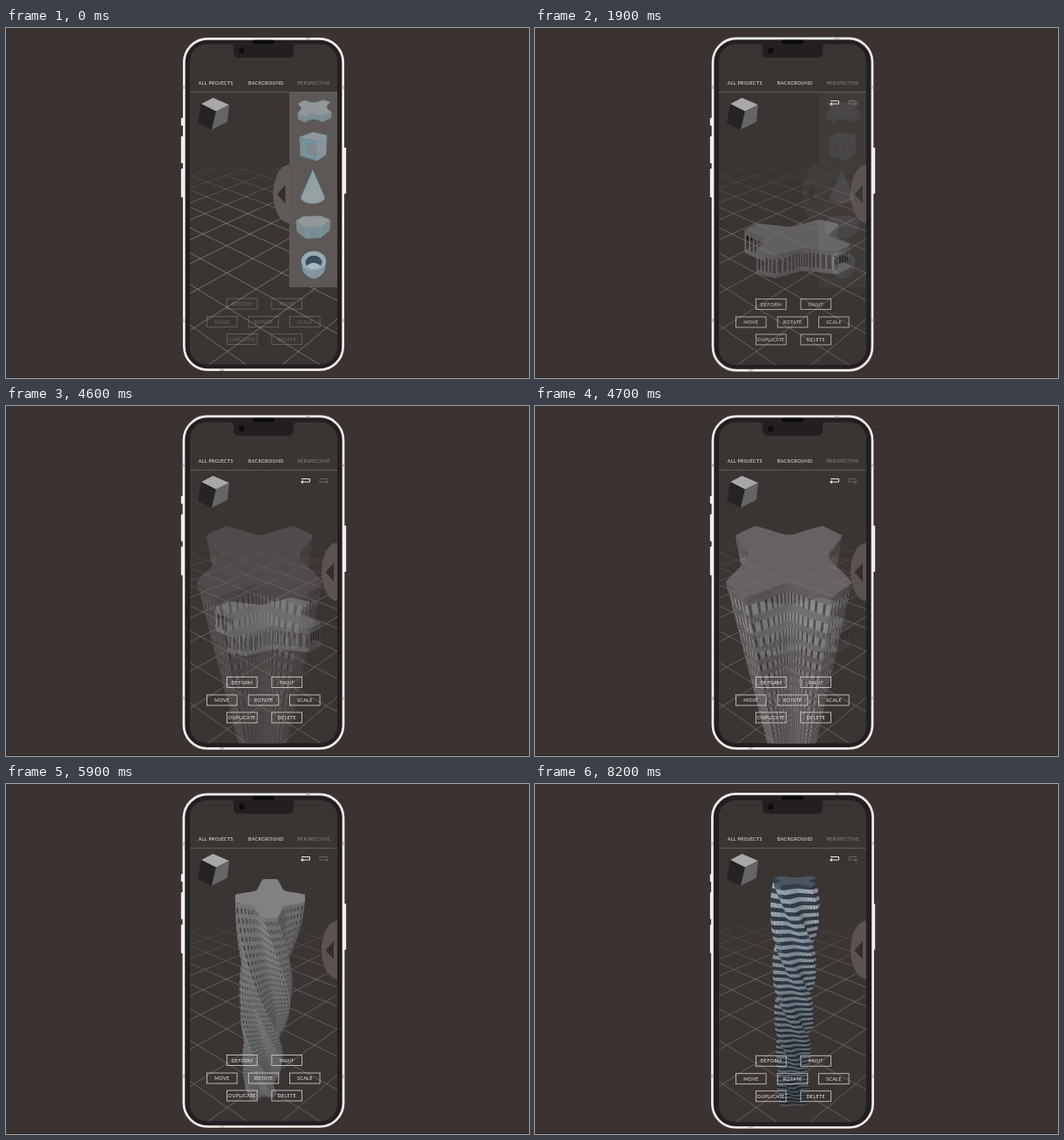
Animation, 600 px wide and 401 px high, one loop 9100 ms. Source, as an HTML page with a canvas:

```html
<!DOCTYPE html>
<html lang="en">
<head>
<meta charset="utf-8">
<title>Phone modelling app</title>
<style>
html, body { margin: 0; width: 100%; height: 100%; overflow: hidden; background: #3b3331; }
canvas { display: block; }
</style>
</head>
<body>
<canvas id="stage" width="600" height="401"></canvas>
<script>
const LOOP = 9100;
const FADES = [[1600, 5], [4600, 3], [5700, 3], [7800, 5]]; // start, steps of 100 ms
const BACK = '#3b3331', BEZEL = '#231f20', WHITE = '#f1efec';
const TAU = Math.PI * 2;

let c; // context being painted

function shape(d, fill, stroke, width = 0.5) {
  const p = new Path2D(d);
  if (fill) { c.fillStyle = fill; c.fill(p); }
  if (stroke) { c.strokeStyle = stroke; c.lineWidth = width; c.stroke(p); }
}

function rect(x, y, w, h, fill) {
  c.fillStyle = fill;
  c.fillRect(x, y, w, h);
}

function round(x, y, w, h, r, fill, stroke, width) {
  c.beginPath();
  c.roundRect(x, y, w, h, r);
  if (fill) { c.fillStyle = fill; c.fill(); }
  if (stroke) { c.strokeStyle = stroke; c.lineWidth = width; c.stroke(); }
}

function oval(x, y, rx, ry, fill, stroke) {
  c.beginPath();
  c.ellipse(x, y, rx, ry, 0, 0, TAU);
  if (fill) { c.fillStyle = fill; c.fill(); }
  if (stroke) { c.strokeStyle = stroke; c.lineWidth = 0.6; c.stroke(); }
}

function label(text, x, y, color, align = 'left') {
  c.font = '5.4px Lato, "Open Sans", sans-serif';
  c.letterSpacing = '0.3px';
  c.textAlign = align;
  c.textBaseline = 'middle';
  c.fillStyle = color;
  c.fillText(text, x, y);
}

// ---- phone and interface ----

function phone(g) {
  const x = 203 - g / 2, y = 11 - g / 2, w = 185 + g, h = 382 + g * 1.5;
  for (const [by, bh] of [[103, 9], [124, 31], [161, 33]]) round(200.8, by, 3, bh, 1, WHITE);
  round(387, 137, 3.2, 53, 1, WHITE);
  round(x + 1.3, y + 1.3, w - 2.6, h - 2.6, 27, BEZEL, WHITE, 2.7);
  const mark = '#a5a19e90';
  for (const my of [66, 333]) {
    rect(x - 0.3, my, 2.8, 4, mark);
    rect(x + w - 2.5, my, 2.8, 4, mark);
  }
  rect(344, y, 5, 2.6, mark);
  rect(245, y + h - 2.6, 5, 2.6, mark);
}

function notch() {
  shape('M258,18.5 Q261,18.5 261,22 V28 Q261,34 267,34 H324 Q330,34 330,28 V22 Q330,18.5 333,18.5 Z', BEZEL);
  round(283, 13.8, 25, 4.5, 2, '#0c0b0b');
  oval(270.5, 26, 3.4, 3.4, '#0d0c0e');
}

function grid(color) {
  const left = [-313, -30], right = [815, -30], o = [280, 236], step = 0.048;
  const fade = c.createLinearGradient(0, 150, 0, 225);
  fade.addColorStop(0, color + '00');
  fade.addColorStop(1, color + 'd0');
  c.strokeStyle = fade;
  c.lineWidth = 0.6;
  for (const [from, to] of [[left, right], [right, left]])
    for (let n = -14; n < 24; n++) {
      const k = step * n;
      const x = (o[0] + k * from[0]) / (1 + k), y = (o[1] + k * from[1]) / (1 + k);
      c.beginPath();
      c.moveTo(to[0], to[1]);
      c.lineTo(to[0] + (x - to[0]) * 4, to[1] + (y - to[1]) * 4);
      c.stroke();
    }
}

function header() {
  label('ALL PROJECTS', 220.8, 63.6, '#efedeb');
  label('BACKGROUND', 278, 63.6, '#efedeb');
  label('PERSPECTIVE', 334.5, 63.6, '#8d8885');
  rect(211, 73, 169, 0.8, '#6c6663');
  shape('M224,87 L237.5,80 L256,88 L241,95.5 Z', '#a9a8a8');
  shape('M224,87 L241,95.5 L236,116.5 L220,109 Z', '#262324');
  shape('M241,95.5 L256,88 L254,107.5 L236,116.5 Z', '#666565');
}

function handle(x, color) {
  c.beginPath();
  c.ellipse(x, 190, 18.5, 33.5, 0, TAU / 4, TAU * 0.75);
  c.fillStyle = color;
  c.fill();
  shape(`M${x - 14},190.5 l9.5,-10.5 v21 Z`, '#342d2c');
}

function buttons(dy) {
  const rows = [
    [316, ['DEFORM', 270.8], ['PAINT', 322.2]],
    [336.5, ['MOVE', 247.8], ['ROTATE', 295.5], ['SCALE', 342.8]],
    [356.5, ['DUPLICATE', 270.8], ['DELETE', 322.2]]
  ];
  for (const [y, ...row] of rows)
    for (const [text, x] of row) {
      c.strokeStyle = '#d9d6d3';
      c.lineWidth = 0.8;
      c.strokeRect(x - 17.3, y + dy - 6, 34.6, 12);
      label(text, x, y + dy + 0.5, '#efedeb', 'center');
    }
}

function history() {
  shape('M340,87 H348.5 V83.5 H339', null, '#efedeb', 1);
  shape('M337.8,87 l3,-2 v4 Z', '#efedeb');
  shape('M368,87 H360 V83.5 H369', null, '#6a6461', 1);
  shape('M370.2,87 l-3,-2 v4 Z', '#6a6461');
}

// ---- panel of solids ----

function panel() {
  const edge = '#62a9c4', top = '#929799', side = '#7f888c';
  c.globalAlpha = 0.93;
  rect(325, 74, 55, 223, '#605a58');
  c.globalAlpha = 1;
  handle(325, '#605a58');

  const star = 'M335,87 L342,83 Q354,88 364,82.5 L372,85 Q363,91 373,96 L363,101 Q352,95 343,101 L335,97 Q343,92 335,87 Z';
  shape('M335,87 Q343,92 335,97 V104 L343,108 Q352,101 363,107.5 L373,103 V96 L363,91 Z', side, edge);
  shape(star, top, '#86979f');
  for (let i = 0; i < 8; i++) {
    const y = 100.5 - Math.sin(i / 7 * Math.PI) * 3;
    shape(`M${343 + i * 2.9},${y} v6.5`, null, edge, 0.4);
  }

  shape('M337,125 L352,119.5 L368,123 L357,129.5 Z', top, edge);
  shape('M337,125 L357,129.5 V152 L338,146.5 Z', side, edge);
  shape('M357,129.5 L368,123 L367,145 L357,152 Z', '#8d9294', edge);
  shape('M342,129 V145 L354,148 M342,129 L355,132', null, edge, 1);

  shape('M352,163 L338.5,194 A13.5,7 0 0 0 365.5,194 Z', '#9aa09f', edge);
  for (let i = 1; i < 12; i++) {
    const a = i / 12 * Math.PI;
    shape(`M352,163 L${352 - 13.5 * Math.cos(a)},${194 + 7 * Math.sin(a)}`, null, edge, 0.15);
  }

  shape('M333,221 L343,228.5 L361,228 L372,221 L371,232 L361,240 L344,241 L334,233 Z', side, edge);
  shape('M333,221 L341,216 L361,215.5 L372,220 L361,228 L343,228.5 Z', top, '#86979f');
  shape('M344,229 V240 M347,229 V240 M358,229 V240 M361,228.5 V239.5', null, edge, 0.8);

  shape('M339,267 A14,11 0 0 1 367,267 L365,279 Q353,295 341,279 Z', '#87959b', edge);
  oval(353, 267, 14, 11, '#9ea9ad', edge);
  oval(353, 268.5, 9.6, 7.8, '#2d3a42', edge);
  for (let i = -4; i < 5; i++) shape(`M${353 + i * 2},${262 + Math.abs(i) * 0.6} v8`, null, edge, 0.4);
  shape('M344.5,273 Q353,265 361.5,273 Q353,280 344.5,273 Z', '#a9b8be');
}

// ---- buildings: stacked four-pointed floors ----

const SIDES = 240;

// Radius of the floor outline: blunt tips, hollow sides.
function radius(angle) {
  const q = TAU / 4, tip = 0.2;
  const a = Math.abs(((angle % q) + q * 1.5) % q - q / 2);
  if (a < tip) return 1 / Math.cos(a);
  return 0.58 + 0.44 * ((q / 2 - a) / (q / 2 - tip)) ** 2;
}

function ring({ x, y, rx, ry, turn, wide = 0 }) {
  return Array.from({ length: SIDES + 1 }, (_, i) => {
    const a = i / SIDES * TAU, r = radius(a);
    const px = r * Math.cos(a + turn), py = r * Math.sin(a + turn);
    const near = 1 + wide * py;
    return [x + rx * px * near, y + ry * py * near];
  });
}

function tint([r, g, b], f) {
  return `rgb(${r * f},${g * f},${b * f})`;
}

function polygon(points, fill) {
  c.beginPath();
  points.forEach(p => c.lineTo(p[0], p[1]));
  c.closePath();
  c.fillStyle = fill;
  c.fill();
}

// Paints the walls that face the viewer, far ones first.
function wall(upper, lower, color) {
  const order = [];
  for (let i = 0; i < SIDES; i++) if (upper[i + 1][0] < upper[i][0]) order.push(i);
  order.sort((i, j) => upper[i][1] - upper[j][1]);
  for (const i of order) {
    const [a, b] = [upper[i], upper[i + 1]];
    const facing = (b[1] - a[1]) / Math.hypot(b[0] - a[0], b[1] - a[1]);
    const fill = color(i, 0.9 - 0.25 * facing);
    if (fill) polygon([a, b, lower[i + 1], lower[i]], fill);
  }
}

function tower({ floors, place, slab, roof, pane, gap, part = 0.4, dim = 0 }) {
  for (let k = floors - 1; k >= 0; k--) {
    const top = ring(place(k)), under = ring(place(k + part)), foot = ring(place(k + 1));
    const depth = 1 - dim * k / floors;
    wall(under, foot, (i, f) => tint(i % 3 ? pane : gap, f * depth));
    wall(top, under, (i, f) => tint(slab, f * depth));
    polygon(top, tint(k ? slab : roof, depth));
  }
}

// Floors shrink towards a point below.
function receding(rate, top, vanish, rx, ry, start, twist, wide) {
  return k => {
    const s = 1 / (1 + rate * k);
    return {
      x: vanish[0] + (top[0] - vanish[0]) * s,
      y: vanish[1] + (top[1] - vanish[1]) * s,
      rx: rx * s, ry: ry * s, turn: start - twist * k, wide
    };
  };
}

function pavilion() {
  const at = y => ({ x: 301, y, rx: 65, ry: 22, turn: 0.6 });
  const grey = [112, 110, 110];
  polygon(ring(at(265)), '#454040');
  wall(ring(at(261)), ring(at(266)), (i, f) => tint(grey, f));
  shape('M242,231 H253 V242 L242,244 Z', '#161415');
  shape('M349,259 L361,254 V266 L349,270 Z', '#1d1b1b');
  wall(ring(at(243)), ring(at(262)), (i, f) => i % 3 ? null : tint(grey, f * 1.1));
  wall(ring(at(240)), ring(at(245)), (i, f) => tint(grey, f));
  polygon(ring(at(240)), '#6d6b6b');
}

function highRise() {
  tower({
    floors: 34, part: 0.42,
    place: receding(0.085, [291, 173], [297, 505], 79, 48, TAU / 8, 0, 0.15),
    slab: [118, 116, 116], roof: [124, 122, 122], pane: [158, 156, 156], gap: [72, 69, 69]
  });
}

function twisted() {
  tower({
    floors: 44, part: 0.45,
    place: receding(0.025, [303, 131], [283, 555], 40, 22, 0, 0.096),
    slab: [124, 123, 125], roof: [130, 129, 131], pane: [122, 121, 123], gap: [62, 60, 61], dim: 0.1
  });
}

function glazed() {
  tower({
    floors: 40, part: 0.48,
    place: receding(0.016, [298.5, 111], [292, 764], 29, 6.5, TAU / 8, 0.2),
    slab: [56, 70, 84], roof: [74, 85, 95], pane: [214, 224, 231], gap: [140, 157, 171], dim: 0.5
  });
}

// ---- scenes ----

function scene(build, shift) {
  const layer = document.createElement('canvas');
  layer.width = 600;
  layer.height = 401;
  c = layer.getContext('2d');
  rect(0, 0, 600, 401, BACK);
  rect(0, 400, 600, 1, '#2a2423');
  phone(shift);
  c.save();
  round(211, 18.5, 169, 367 + shift, 19, '#3a3432');
  c.clip();
  grid(build ? '#8f8a87' : '#b0aca9');
  if (build) {
    handle(380.5, '#5a5351');
    build();
    history();
    buttons(shift * 0.7);
  } else {
    c.globalAlpha = 0.3;
    buttons(0);
    c.globalAlpha = 1;
    panel();
  }
  header();
  c.restore();
  notch();
  return layer;
}

const scenes = [
  scene(null, 0), scene(pavilion, 0.7), scene(highRise, 0.7),
  scene(twisted, 0.8), scene(glazed, 1.8)
];
const view = document.getElementById('stage').getContext('2d');
const begin = performance.now();

function frame() {
  const t = (performance.now() - begin) % LOOP;
  const now = FADES.filter(f => f[0] <= t).length;
  view.globalAlpha = 1;
  if (now) {
    const [start, steps] = FADES[now - 1];
    view.drawImage(scenes[now - 1], 0, 0);
    view.globalAlpha = Math.min(1, (Math.floor((t - start) / 100) + 1) / steps);
  }
  view.drawImage(scenes[now], 0, 0);
  requestAnimationFrame(frame);
}
frame();
</script>
</body>
</html>
```
